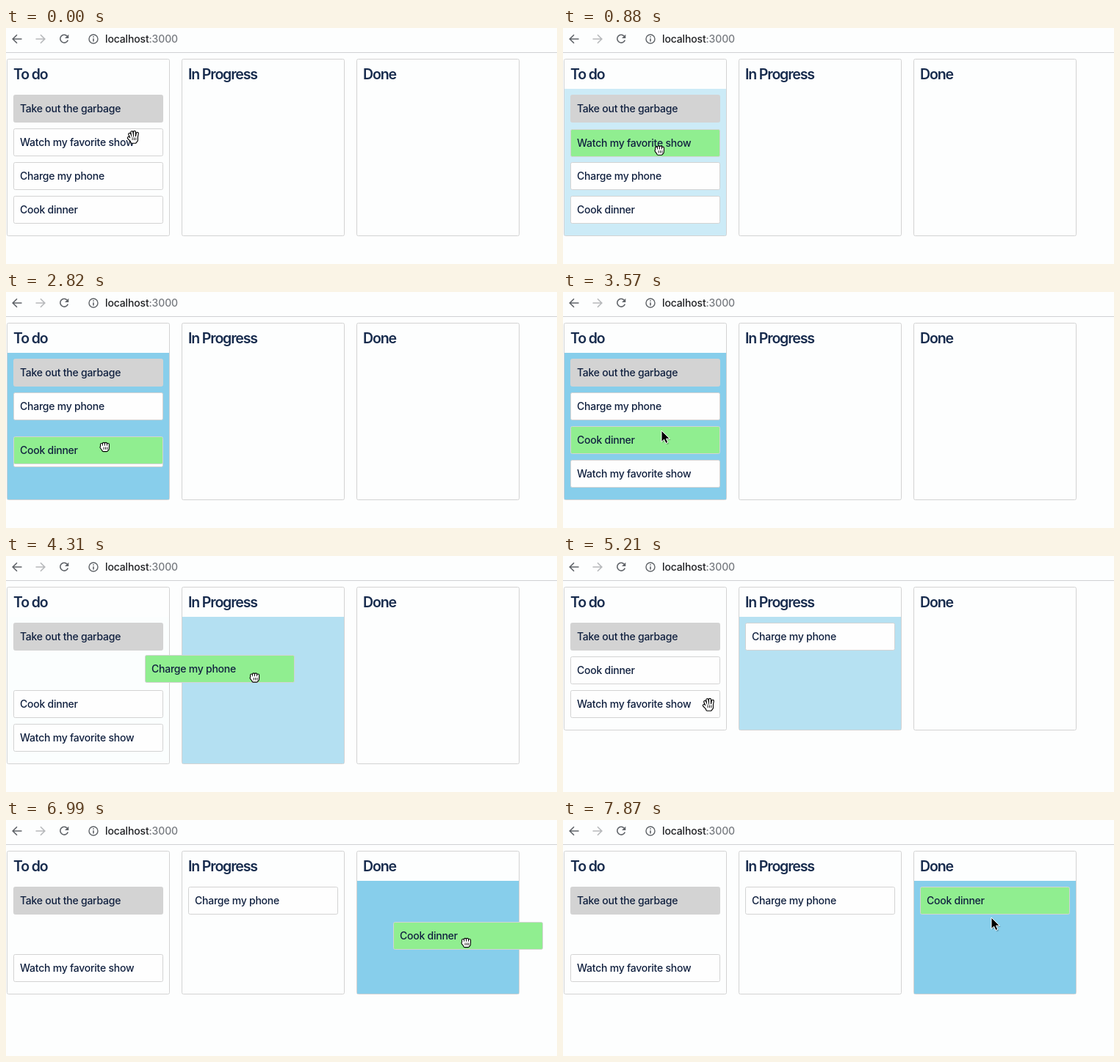
Recreate the animation shown at these times as an HTML page. Size 750 px wide and 322 px high, loop 8 s.

```html
<!DOCTYPE html>
<html lang="en">
<head>
<meta charset="utf-8">
<title>Task board</title>
<style>
html, body { margin: 0; height: 100%; overflow: hidden; background: #fdfefe; }
svg { display: block; width: 750px; height: 322px; font: 14px Inter, "Liberation Sans", sans-serif; fill: #172b4d; }
.card { font-weight: 450; letter-spacing: -.24px; fill: #10203f; }
.title { font-size: 19.5px; font-weight: 600; letter-spacing: -1.15px; }
.url { font-weight: 450; letter-spacing: -.15px; fill: #202124; }
.icon { fill: none; stroke: #5f6368; stroke-width: 1.6; }
</style>
</head>
<body>
<svg viewBox="0 0 750 322">
  <path d="M0 33.5H750" stroke="#d0d1d3"/>
  <g class="icon">
    <path id="arrow" d="M21.5 15H9.5M15 9.2L9.2 15 15 20.8"/>
    <use href="#arrow" transform="matrix(-1 0 0 1 62 0)" opacity=".45"/>
    <path d="M83.3 11.2A5.4 5.4 0 1 0 84.3 16.5"/>
    <path d="M85.3 8.8V14H80.1Z" fill="#5f6368" stroke="none"/>
    <circle cx="119" cy="15" r="6" stroke-width="1.4"/>
    <path d="M119 14.2V18.5M119 11.3V12.8"/>
  </g>
  <text class="url" x="135" y="20">localhost<tspan fill="#777b80">:3000</tspan></text>
  <g id="board"></g>
</svg>
<script>
const LOOP = 8000, STEP = 148.6, SHIFT = 200, SETTLE = 300, COLLAPSE = 5150;
const board = document.getElementById('board');

// over: [enter, leave] times of a dragged card
const columns = [
  { name: 'To do', over: [[700, 1925], [2650, 3710], [3930, 4140], [6414, 6570]] },
  { name: 'In Progress', over: [[4239, 5159], [6600, 6720]] },
  { name: 'Done', over: [[6760, LOOP + 999]] }
];

// Moves with a drop time follow the pointer first; the others slide to their slot
const cards = [
  { name: 'Take out the garbage', done: true, moves: [] },
  { name: 'Watch my favorite show', moves: [
    { t: 700, drop: 1625, row: 2 }, { t: 2738, row: 3 }, { t: COLLAPSE, ms: 1, row: 2 }] },
  { name: 'Charge my phone', moves: [
    { t: 1000, row: 1 }, { t: 3930, drop: 4610, ms: 540, col: 1, row: 0 }] },
  { name: 'Cook dinner', moves: [
    { t: 2650, drop: 3410, row: 2 }, { t: COLLAPSE, ms: 1, row: 1 },
    { t: 6370, drop: 7600, lag: 62, col: 2, row: 0 }] }
];
const drags = cards.flatMap(card => card.moves.filter(m => m.drop)
  .map(m => ({ card, t: m.t, drop: m.drop, end: m.drop + (m.ms || SETTLE) })));

// Pointer legs: start, duration, x, y
const legs = [
  [0, 297, 131, 165], [700, 638, 131, 212], [1930, 448, 134, 242], [2675, 234, 134, 196],
  [3710, 150, 159, 166], [4000, 458, 397, 164], [4309, 149, 397, 137], [4800, 400, 198, 202],
  [5200, 298, 153, 187], [5650, 290, 109, 164], [6370, 385, 626, 166], [6984, 440, 583, 140]
];

const part = (t, start, ms) => Math.min(1, Math.max(0, (t - start) / ms));
const smooth = k => k * k * (3 - 2 * k);
const mix = (p, q, k) => p.map((v, i) => v + (q[i] - v) * k);
const slot = (col, row) => [10 + 238 * col, 91 + 46 * row];

const pointerAt = t => legs.reduce(
  (p, [start, ms, ...goal]) => mix(p, goal, smooth(part(t, start, ms))), [173, 148]);

function cardAt(i, t) {
  let p = slot(0, i);
  for (const { t: start, drop, ms, lag = 0, col = 0, row } of cards[i].moves) {
    if (t < start) break;
    if (drop) {
      const grip = pointerAt(start), hand = pointerAt(Math.max(start, Math.min(t, drop) - lag));
      p = p.map((v, k) => v + hand[k] - grip[k]);
    }
    p = mix(p, slot(col, row), smooth(part(t, drop || start, ms || (drop ? SETTLE : SHIFT))));
  }
  return p.map(Math.round);
}

const fade = (t, start) => 1 - (1 - part(t, start, 200)) ** 2.2;
const tint = (spans, t) => Math.max(...spans.map(([a, b]) => fade(t, a) * (1 - fade(t, b))));

const box = (x, y, w, h, fill) =>
  `<rect x="${x + .5}" y="${y + .5}" width="${w - 1}" height="${h - 1}" rx="2" fill="${fill}" stroke="#d3d3d3"/>`;

function drawColumn({ name, over }, i, t) {
  const x = 1 + 238 * i, h = t < COLLAPSE ? 242 : 196;
  return box(x, 42, 222, h, 'none') +
    `<rect x="${x + 1}" y="83" width="220" height="${h - 42}" fill="#87ceeb" opacity="${tint(over, t)}"/>` +
    `<text class="title" x="${x + 9}" y="70">${name}</text>`;
}

function drawCard(card, t, held) {
  const [x, y] = cardAt(cards.indexOf(card), t);
  const fill = held ? '#90ee90' : card.done ? '#d3d3d3' : '#fefefe';
  return box(x, y, 204, 38, fill) + `<text class="card" x="${x + 9}" y="${y + 24}">${card.name}</text>`;
}

const OPEN = 'M-4.8-3.5L-2.8 1M-2-6L-1 0M1.3-6.3V0M4.8-4.5L3.8 1M-6 1L-3 4M-3.5 2L4 0 4 4 2.3 6.3-2 6.3Z';
const CLOSED = 'M-4-2.5V0M-1.4-3.5V0M1.3-3.5V0M4-2.5V1M-4.5 1L-3 3M-3.5 0H4L3.8 3 2.3 4.8-2 4.8Z';
const ARROW = `<g transform="translate(0 -7)">
  <path d="M1.5 1V17L5 14 7.5 19.5 10.5 18 8 13H13Z" fill="#000" opacity=".2"/>
  <path d="M0 0V15.5L3.6 12.2 6 17.5 8.8 16.3 6.5 11.2H11.3Z" fill="#000" stroke="#fff"/></g>`;

const hand = d => `<g transform="translate(.5 .8) scale(1.1)" stroke-linecap="round" stroke-linejoin="round">
  <path d="${d}" fill="#000" stroke="#000" stroke-width="3.8"/>
  <path d="${d}" fill="#fff" stroke="#fff" stroke-width="1.8"/>
  <path d="M-1.3 1V3.5M.9 1V3.5M3 1V3.5" stroke="#000" stroke-width=".8"/></g>`;

function drawPointer(t, drag) {
  const shape = !drag ? hand(OPEN) : t < drag.drop ? hand(CLOSED) : ARROW;
  return `<g transform="translate(${pointerAt(t)})">${shape}</g>`;
}

let shown = -1;
function frame(now) {
  const n = Math.floor((now % LOOP + 8) / STEP);
  if (n !== shown) {
    shown = n;
    const t = n * STEP;
    const drag = drags.find(d => t >= d.t && t < d.end);
    const resting = cards.filter(c => c !== drag?.card);
    board.innerHTML = columns.map((c, i) => drawColumn(c, i, t)).join('') +
      resting.map(c => drawCard(c, t)).join('') +
      (drag ? drawCard(drag.card, t, true) : '') +
      drawPointer(t, drag);
  }
  requestAnimationFrame(frame);
}
requestAnimationFrame(frame);
</script>
</body>
</html>
```
